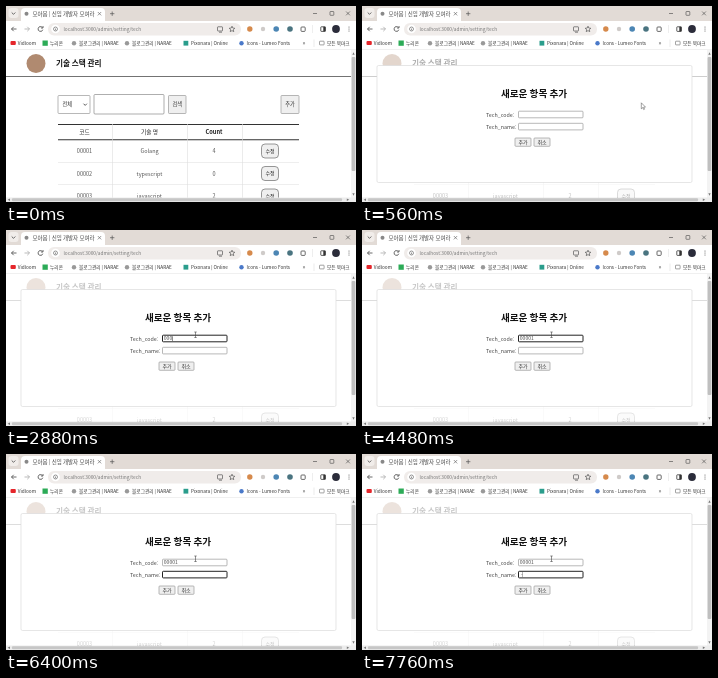
An HTML page with a canvas for the animation above (8 s loop, 350 px wide and 196 px high).

```html
<!DOCTYPE html>
<html lang="ko">
<head>
<meta charset="utf-8">
<style>
html, body { margin: 0; width: 100%; height: 100%; overflow: hidden; background: #fff; }
canvas { display: block; width: 350px; height: 196px; }
</style>
</head>
<body>
<canvas id="stage"></canvas>
<script>
const LOOP = 8000, W = 350, H = 196;
const FONT = '"Noto Sans CJK KR", "Noto Sans CJK", "Noto Sans", sans-serif';
const canvas = document.getElementById('stage');
const ctx = canvas.getContext('2d');
const scale = window.devicePixelRatio || 1;
canvas.width = W * scale;
canvas.height = H * scale;

function rect(x, y, w, h, fill, stroke, radius = 0, line = 0.6) {
  ctx.beginPath();
  ctx.roundRect(x, y, w, h, radius);
  if (fill) { ctx.fillStyle = fill; ctx.fill(); }
  if (stroke) { ctx.strokeStyle = stroke; ctx.lineWidth = line; ctx.stroke(); }
}
function dot(x, y, r, fill) {
  ctx.beginPath();
  ctx.arc(x, y, r, 0, 7);
  ctx.fillStyle = fill;
  ctx.fill();
}
function path(points, stroke, line = 0.8) {
  ctx.beginPath();
  points.forEach(([x, y]) => ctx.lineTo(x, y));
  ctx.strokeStyle = stroke;
  ctx.lineWidth = line;
  ctx.stroke();
}
function text(s, x, y, size, color = '#333', align = 'left', weight = 400) {
  ctx.font = `${weight} ${size}px ${FONT}`;
  ctx.fillStyle = color;
  ctx.textAlign = align;
  ctx.textBaseline = 'alphabetic';
  ctx.fillText(s, x, y);
}
function button(label, x, y, w, h, size, radius = 0.8, ink = '#333', edge = '#8a8a8a') {
  rect(x, y, w, h, '#efefef', edge, radius);
  text(label, x + w / 2, y + h / 2 + size * 0.36, size, ink, 'center');
}
function cross(x, y, r, color) {
  path([[x - r, y - r], [x + r, y + r]], color, 0.6);
  path([[x + r, y - r], [x - r, y + r]], color, 0.6);
}

function drawBrowser() {
  rect(0, 0, W, 15, '#e2dbd6');
  rect(2.5, 2, 10, 10, '#f1edea', null, 3);
  path([[5.7, 6.5], [7.5, 8.3], [9.3, 6.5]], '#444');
  rect(15, 2, 84, 14, '#fff', null, [4, 4, 0, 0]);
  dot(20.5, 7.7, 2, '#888');
  text('모아봄 | 신입 개발자 모여라', 26.5, 9.7, 5.5, '#444');
  cross(93.5, 7.7, 1.7, '#555');
  path([[104, 7.7], [108.4, 7.7]], '#555', 0.7);
  path([[106.2, 5.5], [106.2, 9.9]], '#555', 0.7);
  path([[307, 7.5], [311, 7.5]], '#444', 0.6);
  rect(324, 5.5, 3.8, 3.8, null, '#444', 0.5, 0.6);
  cross(342, 7.4, 1.9, '#444');

  rect(0, 15, W, 29, '#fff');
  for (const [x, dir, color] of [[5.5, 1, '#444'], [23.5, -1, '#aaa']]) {
    path([[x, 23], [x + 5 * dir, 23]], color);
    path([[x + 2.2 * dir, 20.8], [x, 23], [x + 2.2 * dir, 25.2]], color);
  }
  ctx.beginPath();
  ctx.arc(34.5, 23, 2.4, 0.3, 5.6);
  ctx.strokeStyle = '#444';
  ctx.lineWidth = 0.8;
  ctx.stroke();
  path([[37, 20], [37, 22], [35, 22]], '#444');

  rect(42, 17, 193, 12.5, '#f0ecea', null, 6);
  dot(49.5, 23, 4.3, '#fff');
  ctx.beginPath();
  ctx.arc(49.5, 23, 2, 0, 7);
  ctx.strokeStyle = '#555';
  ctx.lineWidth = 0.6;
  ctx.stroke();
  path([[49.5, 22.5], [49.5, 24.2]], '#555', 0.6);
  text('localhost:3000/admin/setting/tech', 57.5, 24.9, 4.8, '#777');
  rect(211.5, 20.8, 5, 4.2, null, '#555', 0.5, 0.7);
  path([[213, 26.2], [216, 26.2]], '#555', 0.7);
  ctx.beginPath();
  for (let i = 0; i < 10; i++) {
    const r = i % 2 ? 1.4 : 3, a = i * Math.PI / 5 - Math.PI / 2;
    ctx.lineTo(226 + r * Math.cos(a), 23.2 + r * Math.sin(a));
  }
  ctx.closePath();
  ctx.stroke();
  dot(243.8, 23, 2.7, '#d68a4c');
  dot(257, 23, 2.2, '#cfcbc9');
  dot(270.2, 23, 2.8, '#4c86b4');
  dot(284, 23, 2.8, '#4a7480');
  rect(295, 21, 4.2, 4.4, null, '#444', 0.8, 0.8);
  path([[306.5, 19], [306.5, 27]], '#e2e2e2', 0.6);
  rect(314.8, 20.8, 4.6, 4.6, '#fff', '#333', 0.5, 0.8);
  rect(317.3, 20.8, 2.1, 4.6, '#333');
  dot(330, 23, 3.9, '#2b2c3a');
  [20.9, 23, 25.1].forEach(y => dot(343, y, 0.5, '#444'));

  rect(4.5, 35, 5.3, 4, '#e5262b', null, 1);
  text('Vidloom', 11.8, 38.8, 4.7);
  rect(36.5, 34.5, 5.3, 5.3, '#2cab57');
  text('누리온', 44, 38.8, 4.7);
  dot(68, 37.2, 2.2, '#999');
  text('블로그관리 | NARAE', 73, 38.8, 4.7);
  dot(121, 37.2, 2.2, '#999');
  text('블로그관리 | NARAE', 126, 38.8, 4.7);
  rect(177.5, 34.8, 4.8, 4.8, '#2a9d8c');
  text('Pixonara | Online', 185, 38.8, 4.7);
  dot(235.5, 37.2, 2.2, '#4a79c9');
  text('Icons - Lumeo Fonts', 240.5, 38.8, 4.7);
  text('»', 296.5, 39, 6, '#444');
  path([[308, 33.5], [308, 41]], '#ddd', 0.6);
  rect(313.5, 35.2, 4.6, 3.7, null, '#666', 0.5, 0.6);
  text('모든 북마크', 321, 38.8, 4.7);
  rect(0, 43.4, W, 0.6, '#e2e2e2');
}

function drawRow(y, code, name, count) {
  text(code, 78.5, y + 2, 5.5, '#555', 'center');
  text(name, 143.5, y + 2, 5.5, '#555', 'center');
  text(count, 208, y + 2, 5.5, '#555', 'center');
  button('수정', 255.5, y - 7, 17, 14, 5, 3.5, '#222', '#555');
  rect(52, y + 11, 241, 0.6, '#ddd');
}

function drawPage() {
  rect(0, 44, 345, 148, '#fff');
  dot(30, 57.5, 9.5, '#b08a70');
  text('기술 스택 관리', 50, 60.2, 7.6, '#111', 'left', 700);
  rect(0, 70, 345, 0.8, '#444');
  rect(52, 89.5, 32, 18, '#fff', '#888', 1);
  text('전체', 56.5, 100.3, 5.2);
  path([[77.5, 97.7], [79.2, 99.4], [80.9, 97.7]], '#333');
  rect(88, 88.5, 70, 19.5, '#fff', '#777', 1);
  button('검색', 162.5, 89.5, 17.5, 18, 5.2);
  button('추가', 275, 89.5, 18, 18, 5.2);

  rect(52, 118, 241, 0.9, '#333');
  rect(52, 133.3, 241, 0.9, '#333');
  [106, 181, 236].forEach(x => rect(x, 118, 0.6, 74, '#ddd'));
  text('코드', 78.5, 128.3, 5.7, '#222', 'center', 500);
  text('기술 명', 143.5, 128.3, 5.7, '#222', 'center', 500);
  text('Count', 208, 128.3, 5.7, '#222', 'center', 700);
  drawRow(145, '00001', 'Golang', '4');
  drawRow(167.5, '00002', 'typescript', '0');
  drawRow(190, '00003', 'javascript', '2');
}

function drawScrollbars() {
  rect(345, 44, 5, 148, '#f3f3f3');
  rect(345.6, 51, 3.8, 114, '#bfbfbf', null, 1);
  rect(0, 191.5, W, 4.5, '#ececec');
  rect(6, 192.2, 330, 3, '#c6c6c6', null, 1);
  const arrow = (x, y, dx, dy) => {
    ctx.beginPath();
    ctx.moveTo(x + dx, y + dy);
    ctx.lineTo(x - dx + dy, y - dy + dx);
    ctx.lineTo(x - dx - dy, y - dy - dx);
    ctx.fillStyle = '#777';
    ctx.fill();
  };
  arrow(347.5, 47.5, 0, -1.2);
  arrow(347.5, 188.5, 0, 1.2);
  arrow(2.8, 193.8, -1.2, 0);
  arrow(342, 193.8, 1.2, 0);
}

function drawField(label, y, value, focused, caret) {
  text(label, 124, y + 5.4, 5.35, '#444');
  rect(156.5, y, 64.5, 6.6, '#fff', focused ? '#222' : '#888', 0.8, focused ? 1 : 0.6);
  text(value, 157.8, y + 5.1, 5.05, '#555');
  if (caret) rect(157.8 + ctx.measureText(value).width, y + 1, 0.5, 4.7, '#222');
}

const passed = (t, times) => times.filter(time => t >= time).length;

function drawModal(t) {
  const opacity = Math.min(0.76, 0.65 + (t - 560) / 1500);
  rect(0, 44, 345, 147.5, `rgba(255,255,255,${opacity})`);
  rect(15, 59.5, 315, 117, '#fff', '#dcdcdc', 1.5, 0.7);
  text('새로운 항목 추가', 172, 90.6, 9.6, '#111', 'center', 700);

  const onCode = t >= 1280 && t < 4800, onName = t >= 4800;
  const code = '00001'.slice(0, passed(t, [2400, 2560, 2880, 3440, 3920]));
  const codeCaret = onCode && !(t >= 1840 && t < 2400) && t < 4480;
  // The name caret toggles at each of these times.
  const nameCaret = onName && passed(t, [5360, 5840, 6400, 6960, 7520]) % 2 === 0;
  drawField('Tech_code:', 105.2, code, onCode, codeCaret);
  drawField('Tech_name:', 117.3, t >= 7120 ? 'ㅓ' : '', onName, nameCaret);
  button('추가', 153, 132, 16, 8.3, 5);
  button('취소', 172, 132, 16, 8.3, 5);
}

function drawPointer(t) {
  if (t < 400) return;
  if (t < 1040) {
    const step = passed(t, [880, 960]);
    const x = 279.3 - step * 36, y = 96.8 + step * 2;
    ctx.beginPath();
    [[0, 0], [0, 6], [1.4, 4.8], [2.4, 6.8], [3.2, 6.4], [2.3, 4.4], [4.2, 4.3]]
      .forEach(([dx, dy]) => ctx.lineTo(x + dx, y + dy));
    ctx.closePath();
    ctx.fillStyle = '#fff';
    ctx.fill();
    ctx.strokeStyle = '#444';
    ctx.lineWidth = 0.5;
    ctx.stroke();
  } else {
    path([[189.5, 102], [189.5, 107.5]], '#444', 0.6);
    path([[188.3, 102], [190.7, 102]], '#444', 0.6);
    path([[188.3, 107.5], [190.7, 107.5]], '#444', 0.6);
  }
}

function render(now) {
  const t = now % LOOP;
  ctx.setTransform(scale, 0, 0, scale, 0, 0);
  drawPage();
  if (t >= 560) drawModal(t);
  drawScrollbars();
  drawBrowser();
  drawPointer(t);
}

const start = performance.now();
function tick(now) {
  render(Math.max(0, now - start));
  requestAnimationFrame(tick);
}
requestAnimationFrame(tick);
</script>
</body>
</html>
```
